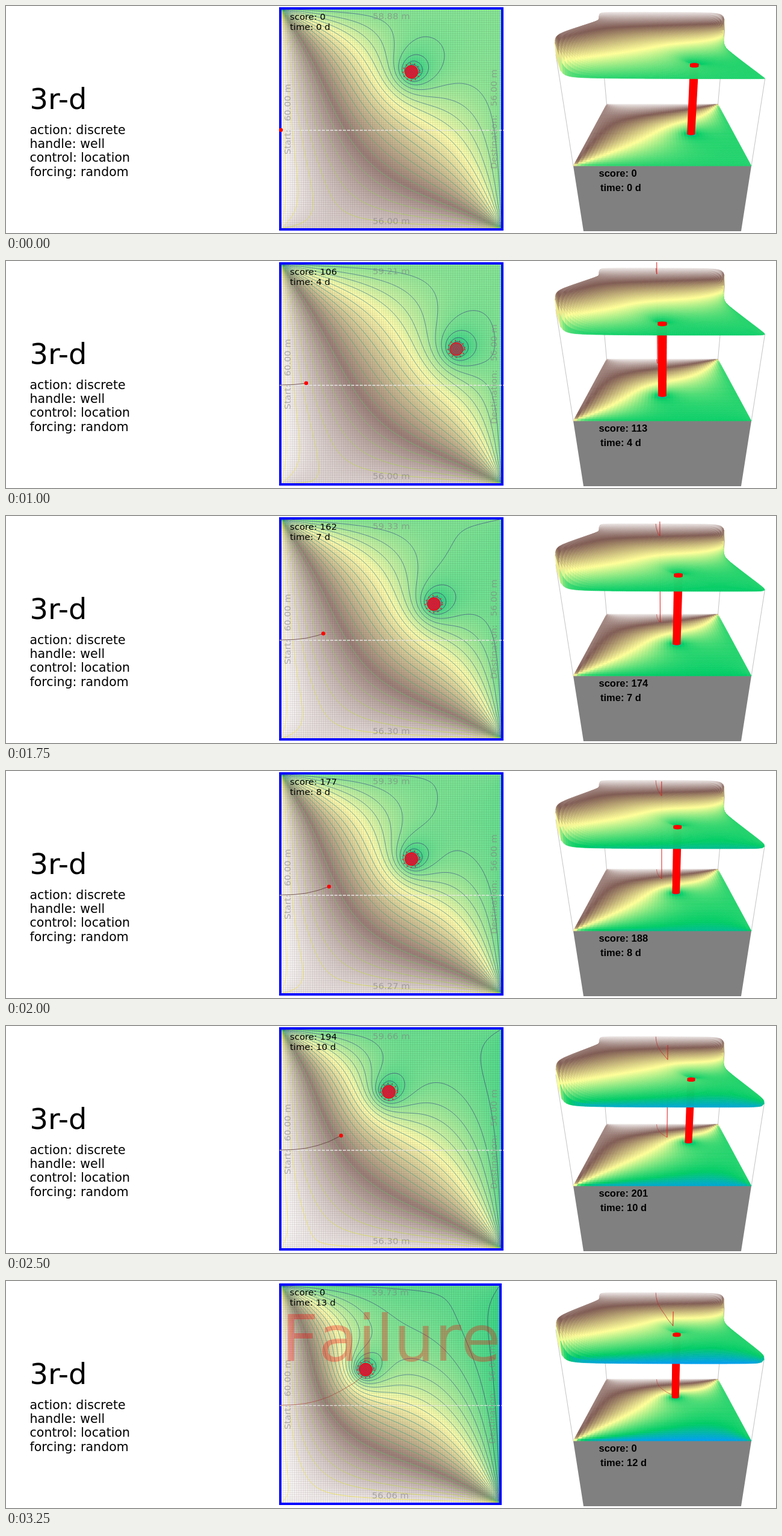
Animation of 1280x379 px, one loop 3.5 s. Source, as an HTML page with a canvas:

```html
<!DOCTYPE html>
<html lang="en">
<head>
<meta charset="utf-8">
<title>3r-d</title>
<style>
  html, body { margin: 0; width: 100%; height: 100%; overflow: hidden; background: #fff; }
  canvas, svg { position: absolute; left: 0; top: 0; width: 1280px; height: 379px; }
  text { font-family: "DejaVu Sans", sans-serif; white-space: pre; }
  .list { font-size: 20.6px; }
  .map { font-size: 14.9px; }
  .head { fill: #808080; fill-opacity: .58; text-anchor: middle; }
  .bold { font: bold 16.5px "Liberation Sans", Arial, sans-serif; }
  #failure { font-size: 107px; font-kerning: none; fill: #f00; fill-opacity: .3; }
</style>
</head>
<body>
<canvas id="view" width="1280" height="379"></canvas>
<svg viewBox="0 0 1280 379">
  <text x="39.5" y="172" font-size="48">3r-d</text>
  <g class="list">
    <text x="39.5" y="213.5">action: discrete</text>
    <text x="39.5" y="237">handle: well</text>
    <text x="39.5" y="260">control: location</text>
    <text x="39.5" y="283.5">forcing: random</text>
  </g>
  <g id="mapText" class="map">
    <text class="head" id="topHead" x="640.5" y="22"></text>
    <text class="head" id="bottomHead" x="640.5" y="364"></text>
    <text class="head" transform="translate(473 189) rotate(-90)">Start:   60.00 m</text>
    <text class="head" transform="translate(816 189) rotate(-90)">Destination:   56.00 m</text>
    <text id="mapScore" x="472" y="22.5"></text>
    <text id="mapTime" x="472" y="39.5"></text>
  </g>
  <text id="failure" x="458" y="133">Failure</text>
  <text class="bold" id="boxScore" x="985.5" y="285.3"></text>
  <text class="bold" id="boxTime" x="988" y="309.3"></text>
</svg>
<script>
const STEP = 250, STEPS = 14, N = 99, M = N + 1;
const ctx = document.getElementById('view').getContext('2d');
const byId = id => document.getElementById(id);

// Values at chosen days, linear in between
const DAYS = [0, 2, 4, 6, 8, 10, 13];
function at(values, day, days = DAYS) {
  let i = 0;
  while (i < days.length - 2 && day > days[i + 1]) i++;
  const k = Math.min(1, (day - days[i]) / (days[i + 1] - days[i]));
  return values[i] + (values[i + 1] - values[i]) * k;
}

const TOP_HEAD = [58.88, 59.02, 59.21, 59.27, 59.39, 59.66, 59.73];
const BOTTOM_HEAD = [56, 56, 56, 56.33, 56.27, 56.30, 56.06];
const MAP_SCORE = [0, 29, 56, 82, 106, 127, 146, 162, 177, 187, 194, 198, 200, 0];
const BOX_SCORE = [0, 31, 59, 87, 113, 136, 157, 174, 188, 196, 201, 204, 205, 0];
// Well cells: column digit, row digit
const MAP_WELL = '67 77 87 87 86 86 86 76 66 56 57 47 46 46'.split(' ');
const BOX_WELL = '67 77 77 76 75 75 76 66 56 46 47 47 46 46'.split(' ');
const MAP_EDGE = {
  bottom: [.91, .915, .92, .935, .945, .96, .975],
  top: [.35, .35, .35, .345, .335, .315, .3],
  right: [.35, .35, .345, .328, .31, .285, .255]
};
const BACK_Z = [.2045, .206, .2028, .2045, .1985, .196, .1935];
const FRONT_Z = [.133, .1358, .131, .1327, .1263, .1214, .119];

const TRACK_DAYS = [0, 2, 4, 6, 8, 10, 12];
const MAP_TRACK = { x: [457, 479, 499, 518, 537, 557, 579], y: [207, 206.3, 204, 199.5, 193, 183, 170] };
const BOX_TRACK = { x: [0, .061, .105, .161, .227, .303, .351], y: [.449, .4525, .4585, .4695, .495, .538, .575] };
const trackPoint = (track, day) => [at(track.x, day, TRACK_DAYS), at(track.y, day, TRACK_DAYS)];
function trackPoints(track, day) {
  const points = [];
  for (let d = 0; d <= Math.min(day, 12); d += .5) points.push(trackPoint(track, d));
  return points;
}

const TERRAIN = [[0, 51, 51, 153], [.15, 0, 153, 255], [.25, 0, 204, 102], [.5, 255, 255, 153], [.75, 128, 92, 84], [1, 255, 255, 255]];
const LINES = [[0, 68, 1, 84], [.25, 59, 82, 139], [.5, 33, 145, 140], [.75, 94, 201, 98], [1, 253, 231, 37]];
function ramp(stops, t) {
  t = Math.max(0, Math.min(1, t));
  let i = 0;
  while (i < stops.length - 2 && t > stops[i + 1][0]) i++;
  const a = stops[i], b = stops[i + 1], k = (t - a[0]) / (b[0] - a[0]);
  return [1, 2, 3].map(c => Math.round(a[c] + (b[c] - a[c]) * k));
}
const rgb = c => `rgb(${c})`;

// Steady flow in a square with fixed edges and a well held at a low head
function solve(left, bottom, top, right, col, row, head) {
  const f = new Float32Array(M * M).fill((left + bottom + top + right) / 4);
  for (let i = 0; i < M; i++) {
    f[i] = top;
    f[N * M + i] = bottom;
  }
  for (let j = 1; j < N; j++) {
    f[j * M] = left;
    f[j * M + N] = right;
  }
  f[0] = (left + top) / 2;
  f[N] = (top + right) / 2;
  f[N * M] = (left + bottom) / 2;
  f[N * M + N] = (bottom + right) / 2;

  const fixed = new Uint8Array(M * M);
  for (let y = -2; y <= 2; y++)
    for (let x = -2; x <= 2; x++)
      if (x * x + y * y <= 4) {
        const k = (row + y) * M + col + x;
        fixed[k] = 1;
        f[k] = head;
      }
  const over = 2 / (1 + Math.sin(Math.PI / N));
  for (let n = 0; n < 2 * N; n++)
    for (let j = 1; j < N; j++)
      for (let k = j * M + 1, end = j * M + N; k < end; k++)
        if (!fixed[k]) f[k] += over * ((f[k - 1] + f[k + 1] + f[k - M] + f[k + M]) / 4 - f[k]);
  return f;
}

function strokeLine(points, color, width) {
  ctx.beginPath();
  points.forEach(p => ctx.lineTo(p[0], p[1]));
  ctx.strokeStyle = color;
  ctx.lineWidth = width;
  ctx.stroke();
}
function fillShape(points, color) {
  ctx.beginPath();
  points.forEach(p => ctx.lineTo(p[0], p[1]));
  ctx.closePath();
  ctx.fillStyle = color;
  ctx.fill();
}
function circle(x, y, r) {
  ctx.beginPath();
  ctx.arc(x, y, r, 0, 2 * Math.PI);
}

// ---- flat map ----
const X0 = 457, Y0 = 5, SIZE = 367, CELL = SIZE / N;
const tile = document.createElement('canvas');
tile.width = tile.height = M;
const tileCtx = tile.getContext('2d');

function mapState(day) {
  const [col, row] = MAP_WELL[day];
  const x = 449.5 + 37.4 * col, y = 369 - 37 * row;
  const field = solve(1, at(MAP_EDGE.bottom, day), at(MAP_EDGE.top, day), at(MAP_EDGE.right, day),
    Math.round((x - X0) / CELL), Math.round((y - Y0) / CELL), .2);
  return { x, y, field };
}

function contours(f) {
  const first = .012, gap = .0325, paths = [];
  for (let j = 0; j < N; j++)
    for (let i = 0; i < N; i++) {
      const k = j * M + i, v = [f[k], f[k + 1], f[k + M + 1], f[k + M]];
      const high = Math.max(...v);
      for (let n = Math.max(0, Math.ceil((Math.min(...v) - first) / gap)); first + n * gap < high; n++) {
        const level = first + n * gap, hits = [];
        for (let e = 0; e < 4; e++) {
          const a = v[e], b = v[(e + 1) % 4];
          if ((a > level) === (b > level)) continue;
          const q = (level - a) / (b - a);
          hits.push([[q, 0], [1, q], [1 - q, 1], [0, 1 - q]][e]);
        }
        const path = paths[n] || (paths[n] = new Path2D());
        hits.forEach(([x, y], h) =>
          path[h % 2 ? 'lineTo' : 'moveTo'](X0 + (i + x) * CELL, Y0 + (j + y) * CELL));
      }
    }
  ctx.lineWidth = 1;
  ctx.globalAlpha = .65;
  paths.forEach((path, n) => {
    ctx.strokeStyle = rgb(ramp(LINES, (first + n * gap - .17) / .8));
    ctx.stroke(path);
  });
  ctx.globalAlpha = 1;
}

function drawMap(day, { x, y, field }) {
  const image = tileCtx.createImageData(M, M);
  field.forEach((t, k) => image.data.set([...ramp(TERRAIN, t), 255], k * 4));
  tileCtx.putImageData(image, 0, 0);

  ctx.save();
  if (day === 13) ctx.transform(.992, 0, 0, .992, 456 * .008, 6 - 4 * .992);
  ctx.save();
  ctx.beginPath();
  ctx.rect(X0, Y0, SIZE, SIZE);
  ctx.clip();
  ctx.globalAlpha = .78;
  ctx.drawImage(tile, X0 - CELL / 2, Y0 - CELL / 2, SIZE + CELL, SIZE + CELL);
  ctx.globalAlpha = 1;
  ctx.globalCompositeOperation = 'multiply';
  ctx.fillStyle = '#e8e4e4';
  for (let i = 1; i < N; i++) {
    ctx.fillRect(X0 + i * CELL, Y0, .8, SIZE);
    ctx.fillRect(X0, Y0 + i * CELL, SIZE, .8);
  }
  ctx.globalCompositeOperation = 'source-over';
  contours(field);
  ctx.restore();

  ctx.strokeStyle = '#00f';
  ctx.lineWidth = 4;
  ctx.strokeRect(456, 4, 369, 369);
  ctx.setLineDash([5, 2]);
  strokeLine([[455, 207.5], [827, 207.5]], '#e6e6e6', 1.4);
  ctx.setLineDash([]);

  const points = trackPoints(MAP_TRACK, day);
  if (day === 13) points.push([592, 160], [x, y]);
  strokeLine(points, day === 13 ? 'rgba(165,60,50,.65)' : 'rgba(80,40,40,.7)', 1);
  if (day < 13) {
    circle(...trackPoint(MAP_TRACK, day), 3.2);
    ctx.fillStyle = '#f00';
    ctx.fill();
  }

  circle(x, y, 10.5);
  ctx.fillStyle = day > 3 && day < 7 ? '#965050' : '#dc1e32';
  ctx.fill();
  ctx.strokeStyle = '#e8101c';
  ctx.lineWidth = 1.5;
  ctx.stroke();
  ctx.strokeStyle = 'rgba(130,50,80,.55)';
  ctx.lineWidth = 1;
  for (const r of [2, 5, 8]) {
    circle(x, y, r);
    ctx.stroke();
  }
  circle(x, y, 14);
  ctx.setLineDash([2, 5]);
  ctx.strokeStyle = 'rgba(220,30,40,.75)';
  ctx.lineWidth = 2.5;
  ctx.stroke();
  ctx.restore();
}

// ---- perspective box: u runs from back to front, s from left to right, z up ----
function project(u, s, z) {
  const d = 1 - u, w = 1 + .6 * d - z;
  return [1091 + 296 * (s - .5) / w, (267 - 4.6 * d - 1215 * z) / w, w];
}

function boxState(day) {
  const [col, row] = BOX_WELL[day], u = col / 10, s = row / 10;
  const shown = Math.min(day, 12.5);
  const back = at(BACK_Z, shown), front = at(FRONT_Z, shown);
  const right = .28 + (front - .133) * 9;
  const f = solve(.97, .81, .285, right, Math.round(u * N), Math.round((1 - s) * N), .19);
  const rise = t => front + (t - right) * (back - front) / (.97 - right);
  // Mean of the four nodes around a cell
  const value = (u, s) => {
    const k = Math.round((1 - s) * (N - 1)) * M + Math.round(u * (N - 1));
    return (f[k] + f[k + 1] + f[k + M] + f[k + M + 1]) / 4;
  };
  return { u, s, value, rise, height: (u, s) => rise(value(u, s)) };
}

function surface(value, rise, cells) {
  const nodes = [];
  for (let i = 0; i <= cells; i++)
    for (let j = 0; j <= cells; j++) {
      const u = i / cells, s = j / cells, t = value(u, s);
      nodes.push({ t, p: project(u, s, rise(t)) });
    }
  ctx.lineWidth = .7;
  for (let i = 0; i < cells; i++)
    for (let j = 0; j < cells; j++) {
      const k = i * (cells + 1) + j;
      const [a, b, c, d] = [k, k + 1, k + cells + 2, k + cells + 1].map(n => nodes[n]);
      fillShape([a.p, b.p, c.p, d.p], rgb(ramp(TERRAIN, (a.t + b.t + c.t + d.t) / 4)));
      ctx.strokeStyle = ctx.fillStyle;
      ctx.stroke();
    }
}

function pole(u, s, low, high) {
  const a = project(u, s, low), b = project(u, s, high);
  const ra = 8.1 / a[2], rb = 8.1 / b[2];
  fillShape([[a[0] - ra, a[1]], [a[0] + ra, a[1]], [b[0] + rb, b[1]], [b[0] - rb, b[1]]], '#f00');
  for (const [p, r] of [[a, ra], [b, rb]]) {
    ctx.beginPath();
    ctx.ellipse(p[0], p[1], r, 1.8, 0, 0, 2 * Math.PI);
    ctx.fill();
  }
}

function drawBox(day, { u, s, value, rise, height }) {
  fillShape([project(1, 0, 0), project(1, 1, 0), project(1, 1, -.13), project(1, 0, -.13)], '#808080');
  for (const [a, b, top] of [[0, 0, .12], [0, 1, .12], [1, 0, .164], [1, 1, height(1, 1)]])
    strokeLine([project(a, b, 0), project(a, b, top)], '#b4b4b4', .8);
  surface(value, () => 0, (N - 1) / 2);

  const points = trackPoints(BOX_TRACK, day);
  const here = trackPoint(BOX_TRACK, Math.min(day, 12));
  const top = height(...here);
  const red = '#e01818';
  if (day) {
    strokeLine(points.map(p => project(...p, 0)), 'rgba(190,40,40,.7)', .8);
    strokeLine([project(...here, 0), project(...here, top)], red, 1);
  }
  const mouth = height(u, s);
  pole(u, s, 0, mouth);
  surface(value, rise, N - 1);
  if (day) {
    ctx.save();
    ctx.beginPath();
    ctx.rect(880, 2, 400, 377);
    ctx.clip();
    strokeLine(points.map(p => project(...p, height(...p))), 'rgba(190,40,40,.8)', .9);
    strokeLine([project(...here, top), project(...here, top + .026)], red, 1);
    ctx.restore();
  }
  pole(u, s, mouth + .002, mouth + .006);
}

// ---- playback ----
const maps = [], boxes = [];
function render(day) {
  ctx.clearRect(0, 0, 1280, 379);
  drawMap(day, maps[day] || (maps[day] = mapState(day)));
  drawBox(day, boxes[day] || (boxes[day] = boxState(day)));

  byId('topHead').textContent = at(TOP_HEAD, day).toFixed(2) + ' m';
  byId('bottomHead').textContent = at(BOTTOM_HEAD, day).toFixed(2) + ' m';
  byId('mapScore').textContent = 'score: ' + MAP_SCORE[day];
  byId('mapTime').textContent = `time: ${day} d`;
  byId('boxScore').textContent = 'score: ' + BOX_SCORE[day];
  byId('boxTime').textContent = `time: ${Math.min(day, 12)} d`;
  byId('failure').style.display = day === 13 ? '' : 'none';
  byId('mapText').setAttribute('transform', day === 13 ? 'translate(456 6) scale(.992) translate(-456 -4)' : '');
}

let shownDay = -1;
const start = performance.now();
function tick() {
  const day = Math.floor(Math.max(0, performance.now() - start) / STEP) % STEPS;
  if (day !== shownDay) render(shownDay = day);
  requestAnimationFrame(tick);
}
tick();
</script>
</body>
</html>
```
